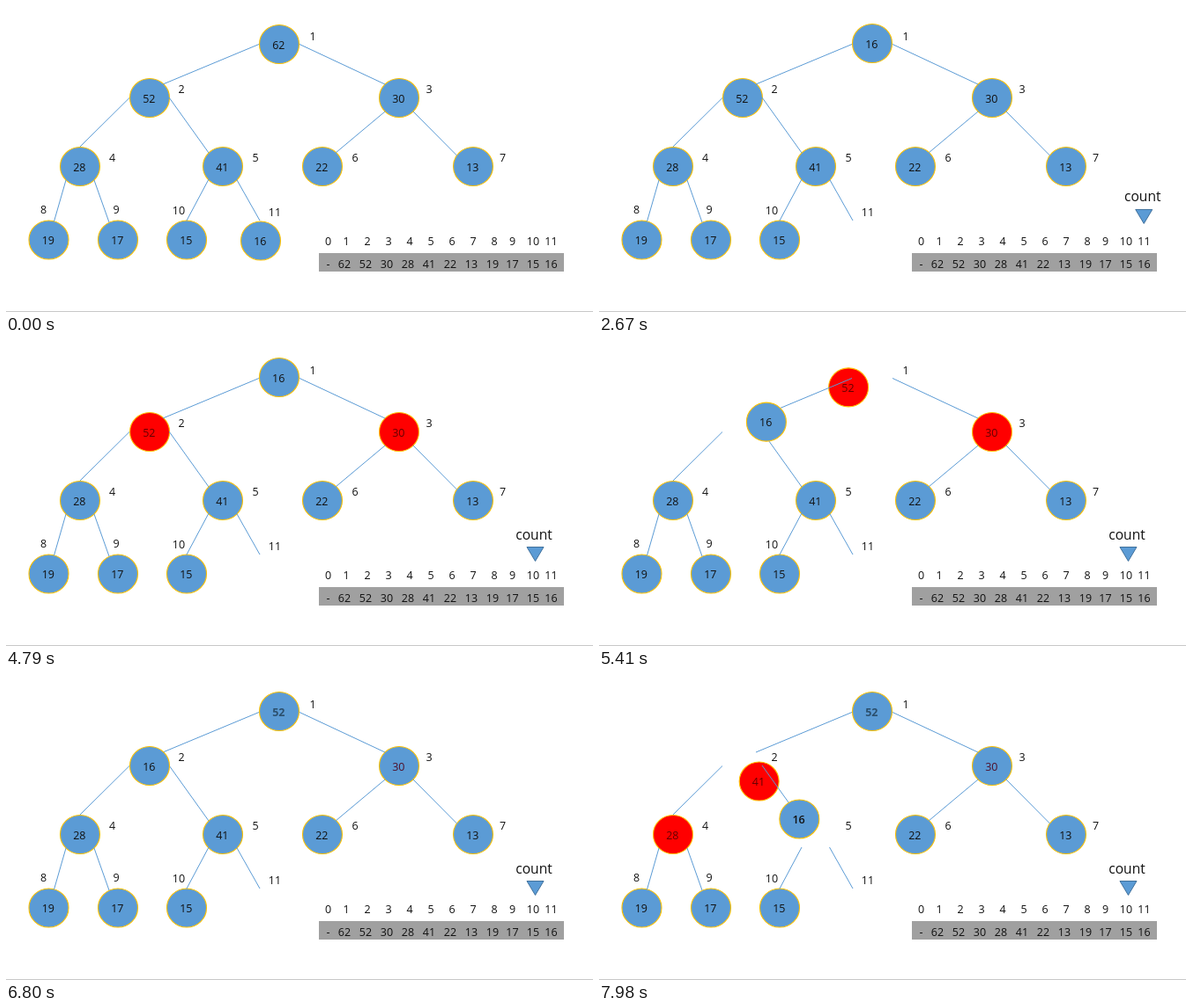
Write an HTML page that moves like this. It is 666 px wide and 348 px high and loops after 8000 ms.

```html
<!DOCTYPE html>
<html lang="en">
<head>
<meta charset="utf-8">
<title>Heap: remove the largest</title>
<style>
html, body { margin: 0; width: 100%; height: 100%; overflow: hidden; background: #fff; }
svg { display: block; width: 100vw; height: 100vh; }
text { font: 12.5px "Open Sans", "Noto Sans", sans-serif; text-anchor: middle; fill: #111; }
ellipse { stroke: #ffc000; stroke-width: 1.1; }
</style>
</head>
<body>
<svg id="stage" viewBox="0 0 666 348">
  <rect width="666" height="348" fill="#fff"/>
  <rect y="347" width="666" height="1" fill="#c8c8c8"/>
  <rect x="355" y="281" width="278" height="21" fill="#a0a0a0"/>
  <g id="nodes"></g>
  <g id="edges" stroke="#5b9bd5"></g>
  <g id="labels"></g>
  <g id="top"></g>
  <g id="count">
    <text x="599" y="226.5" style="font-size:15.6px">count</text>
    <path d="M591 235.5H610L600.5 251.5Z" fill="#5b9bd5" stroke="#41719c"/>
  </g>
</svg>
<script>
const LOOP = 8000;
const BLUE = [91, 155, 213], RED = [255, 0, 0], INK = [17, 17, 17];
const DARK_RED = [100, 0, 0], MAROON = [78, 16, 44], SLATE = [44, 80, 110];
const $ = id => document.getElementById(id);

function add(parent, tag, attrs, content) {
  const el = document.createElementNS("http://www.w3.org/2000/svg", tag);
  for (const k in attrs) el.setAttribute(k, attrs[k]);
  if (content !== undefined) el.textContent = content;
  parent.appendChild(el);
  return el;
}

const clamp = v => Math.max(0, Math.min(1, v));
const ramp = (t, from, to) => clamp((t - from) / (to - from));
const ease = u => u < 0.5 ? 2 * u * u : 1 - 2 * (1 - u) * (1 - u);
const mix = (a, b, k) => a.map((v, i) => v + (b[i] - v) * k);
const rgb = c => `rgb(${c.map(Math.round)})`;

// Tree slots
const ROOT = [310, 42.5], LEFT = [163, 104.5], INNER = [246, 182.5], LAST = [289, 267];

function makeNode(value, [x, y], parent = $("nodes")) {
  const g = add(parent, "g", { transform: `translate(${x} ${y})` });
  const disc = add(g, "ellipse", { rx: 22.5, ry: 22, fill: rgb(BLUE) });
  const text = add(g, "text", { x: -0.7, y: 5.3 }, value);
  return { g, disc, text };
}

const place = (n, [x, y]) => n.g.setAttribute("transform", `translate(${x.toFixed(2)} ${y.toFixed(2)})`);

function paint(n, red, ink) {
  n.disc.setAttribute("fill", rgb(mix(BLUE, RED, red)));
  n.text.style.fill = rgb(ink);
}

const n62 = makeNode(62, [310, 43.5]);
const n52 = makeNode(52, LEFT);
const n30 = makeNode(30, [446, 104.5]);
const n28 = makeNode(28, [84, 182.5]);
const n41 = makeNode(41, INNER);
makeNode(22, [359, 182.5]);
makeNode(13, [530, 182.5]);
makeNode(19, [48.5, 266]);
makeNode(17, [127, 266]);
makeNode(15, [205, 266]);
const n16 = makeNode(16, LAST, $("top"));

[
  "M287 43.5L178 89", "M333 43.5L430 89", "M140 104.5L84 160", "M185 104L230 167",
  "M430 120L374 167", "M462 120L512 170.5", "M68 198L54.5 245", "M100 198L117 246",
  "M230 197L205 244", "M261.5 197L288 244"
].forEach(d => add($("edges"), "path", { d, fill: "none" }));

const label = (s, x, y) => add($("labels"), "text", { x, y: y + 4.5 }, s);
[[348, 34], [199, 94], [480, 94], [120.5, 172], [283, 172], [396, 172],
 [563.5, 172], [42.5, 231], [125, 231], [196, 232], [305, 234]]
  .forEach(([x, y], i) => label(i + 1, x, y));

const columns = [365.5, 386, 410, 434, 458, 482, 506, 530, 554, 574.5, 598, 618.5];
columns.forEach((x, i) => label(i, x, 267));
["-", 62, 52, 30, 28, 41, 22, 13, 19, 17, 15, 16]
  .forEach((v, i) => label(v, columns[i] - (i > 0 && i < 9 ? 2 : 0), 293));

function draw(t) {
  const lift = ease(ramp(t, 136, 2012));
  const swap1 = ease(ramp(t, 4779, 5685));
  const swap2 = ease(ramp(t, 7379, 8285));

  n62.g.setAttribute("opacity", t < 70 ? 1 : t < 2012 ? 0.5 : 0);

  let pos = mix(LAST, ROOT, lift);
  if (t > 4779) pos = mix(ROOT, LEFT, swap1);
  if (t > 7379) pos = mix(LEFT, INNER, swap2);
  place(n16, pos);
  n16.text.style.fontWeight = (t > 136 && t < 2012) ? 700 : t > 7379 ? 600 : 400;
  n16.text.style.fill = t > 136 && t < 2012 ? "#333" : "#111";

  place(n52, mix(LEFT, ROOT, swap1));
  place(n41, mix(INNER, LEFT, swap2));

  // Children being compared turn red, then blue again
  const on1 = ramp(t, 4140, 4779), off1 = ramp(t, 5700, 6700);
  const on2 = ramp(t, 6820, 7379);
  const ink1 = mix(INK, DARK_RED, on1), ink2 = mix(INK, DARK_RED, on2);
  paint(n52, on1 - off1, mix(ink1, SLATE, off1));
  paint(n30, on1 - off1, mix(ink1, MAROON, off1));
  n52.text.style.fontWeight = off1 > 0.5 ? 700 : 400;
  paint(n28, on2, ink2);
  paint(n41, on2, ink2);

  const back = 1 - ease(ramp(t, 2260, 4110));
  $("count").setAttribute("opacity", ramp(t, 1980, 2220));
  $("count").setAttribute("transform", `translate(${(19.7 * back).toFixed(2)} ${(-4.5 * back).toFixed(2)})`);
}

const start = performance.now();
function tick() {
  draw((performance.now() - start) % LOOP);
  requestAnimationFrame(tick);
}
tick();
</script>
</body>
</html>
```
